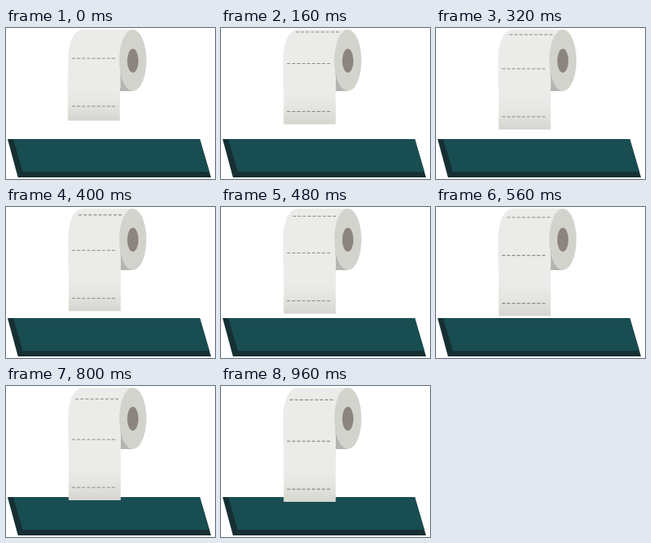
An HTML page for the animation above (1040 ms loop, 262x189 px).

```html
<!DOCTYPE html>
<html lang="en">
<head>
<meta charset="utf-8">
<title>Paper roll</title>
<style>
  html, body { margin: 0; width: 100%; height: 100%; overflow: hidden; background: #fff; }
  svg { display: block; width: 100%; height: 100%; }
  .perf { stroke: #8b8785; stroke-width: 1.2; stroke-dasharray: 4 2.25; }
</style>
</head>
<body>
<svg viewBox="0 0 262 189">
  <defs>
    <linearGradient id="shade" x1="0" y1="0" x2="0" y2="1">
      <stop offset="0" stop-color="#ebebe9"/>
      <stop offset=".4" stop-color="#e6e6e3"/>
      <stop offset="1" stop-color="#d6d6d0"/>
    </linearGradient>
  </defs>
  <path fill="#162f33" d="M2 139H243L257 187H15Z"/>
  <path fill="#184d52" d="M9 139H243L255 180H21Z"/>
  <path fill="#b5b4b0" d="M143 40H159V79H143Z"/>
  <path fill="#ebebe9" d="M159 2H97C85 2 78 18 78 40V75H143.5V40H159Z"/>
  <path id="sheet" fill="#ebebe9"/>
  <path id="fade" fill="url(#shade)"/>
  <path id="top" class="perf"/>
  <path id="mid" class="perf"/>
  <path id="low" class="perf"/>
  <ellipse cx="159" cy="40.5" rx="17" ry="38.5" fill="#d3d3cd"/>
  <ellipse cx="159" cy="41" rx="7" ry="15" fill="#8c8480"/>
</svg>
<script>
const STEP = 80, STEPS = 13;
const set = (id, d) => document.getElementById(id).setAttribute('d', d);
const line = (id, x, y) => set(id, `M${x} ${y}h54.2`);

function draw(k) {
  // steady pull, then slowing down
  const slow = Math.max(0, k - 6);
  const y = 38 + 3.25 * k - 0.22 * slow * slow;
  const end = k ? y + 75.9 : 116;
  const left = k ? 78.5 : 77.5;
  const right = left + 65.3;

  set('sheet', `M${left} 60H${right}V${end - 39}H${left}Z`);
  set('fade', `M${left} ${end - 40}H${right}V${end}H${left}Z`);
  line('mid', 82.8, y);
  line('low', 82.8, y + 60);

  // the upper row follows the curve of the roll
  const topY = 5 + (y - 44.5) / 2;
  if (k) line('top', 94 - (topY - 5) * 0.62, topY);
  else set('top', '');
}

function tick(now) {
  draw(Math.floor(now / STEP) % STEPS);
  requestAnimationFrame(tick);
}
draw(0);
requestAnimationFrame(tick);
</script>
</body>
</html>
```
